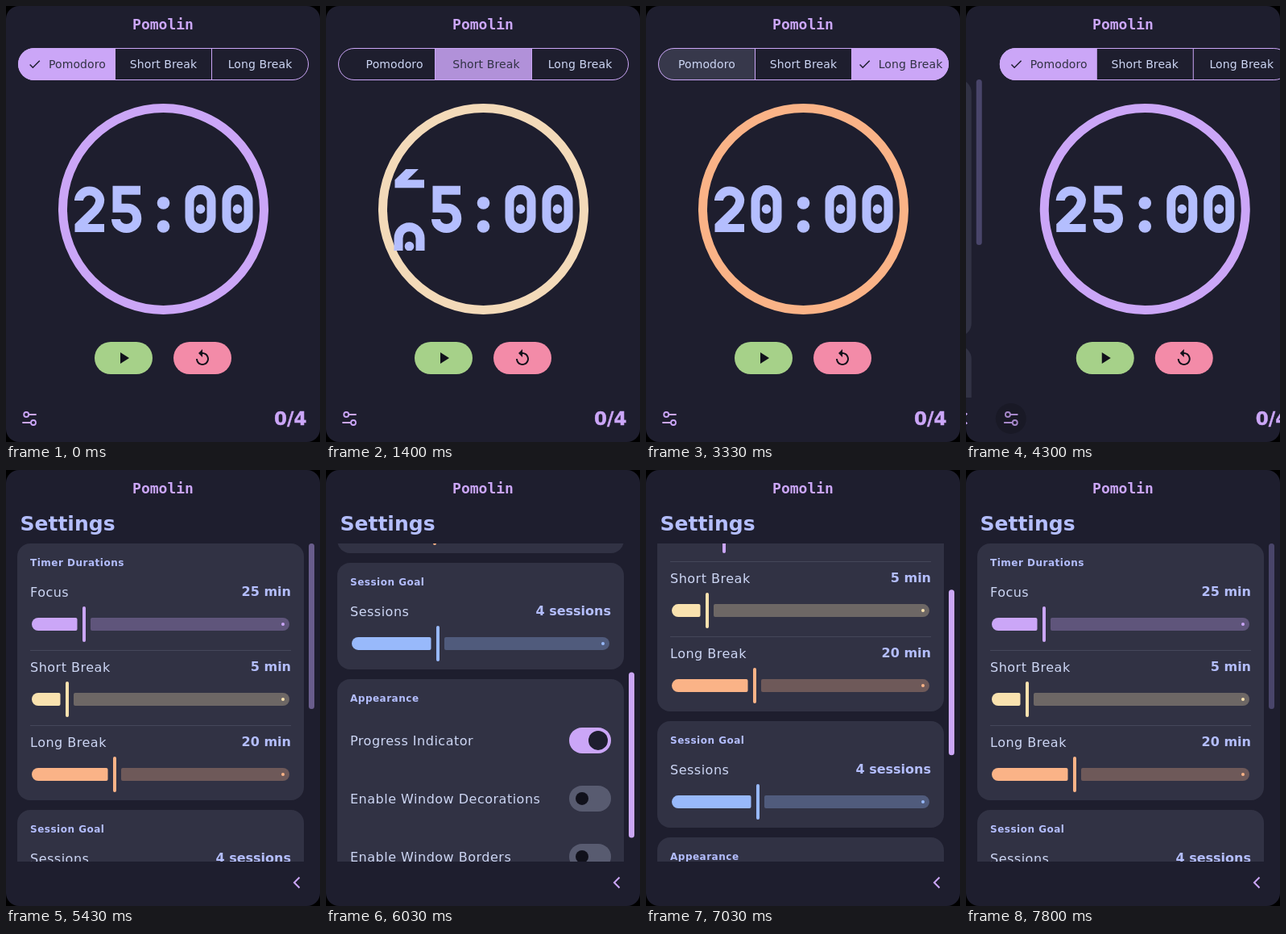
These frames come from a looping animation (390 px wide and 540 px high, 8 s). An HTML page:

```html
<!DOCTYPE html>
<html lang="en">
<head>
<meta charset="utf-8">
<title>Pomodoro timer</title>
<style>
  html, body { margin: 0; width: 100%; height: 100%; overflow: hidden; background: #000; }
  svg { display: block; width: 390px; height: 540px; }
  text { font-family: "DejaVu Sans", sans-serif; fill: #cdd6f4; }
  .title { font: 700 18px "DejaVu Sans Mono", monospace; fill: #cba6f7; text-anchor: middle; }
  .seg { font-size: 14px; letter-spacing: .1px; text-anchor: middle; }
  .goal { font-size: 23px; font-weight: 700; fill: #cba6f7; stroke: #cba6f7; stroke-width: .4; text-anchor: end; }
  .head { font-size: 25px; font-weight: 700; fill: #b4befe; }
  .group { font-size: 12px; font-weight: 700; letter-spacing: .5px; fill: #b4befe; }
  .label { font-size: 16px; letter-spacing: .5px; }
  .value { font-size: 16px; font-weight: 700; fill: #b4befe; text-anchor: end; }
  .line { fill: none; stroke: #cba6f7; }
  .digit { fill: none; stroke: #b4befe; stroke-width: 11; }
  .dot { fill: #b4befe; stroke: none; }
</style>
</head>
<body>
<svg viewBox="0 0 390 540">
  <defs>
    <clipPath id="window"><rect width="390" height="540" rx="16"/></clipPath>
    <clipPath id="pill"><rect x="15" y="52" width="361" height="40" rx="20"/></clipPath>
    <clipPath id="face"><rect x="78" y="202" width="234" height="101"/></clipPath>
    <clipPath id="view"><rect y="91" width="390" height="394"/></clipPath>
    <g id="d0" class="digit">
      <rect x="-13.5" y="-52.5" width="27" height="48" rx="13.5" ry="14"/>
      <circle class="dot" cy="-28.5" r="5.8"/>
    </g>
    <g id="d2" class="digit">
      <path d="M-13 -39V-40A13.2 12.5 0 0 1 13.2 -40C13.2 -34.5 11 -31 7 -26.5L-14 -6"/>
      <path d="M-18 -5H18.5" stroke-width="10"/>
    </g>
    <g id="d5" class="digit">
      <path d="M17.5 -51.7H-11.5V-29.8H1.5A11.8 12.5 0 0 1 13.2 -17.5V-16A13 11.5 0 0 1 -13 -16"/>
    </g>
  </defs>
  <g clip-path="url(#window)">
    <rect width="390" height="540" fill="#1e1e2e"/>
    <g id="timer">
      <g id="tabs"></g>
      <circle id="ring" cx="195.5" cy="251.5" r="125" fill="none" stroke-width="11"/>
      <g id="clock" clip-path="url(#face)"></g>
      <rect x="110" y="416" width="72" height="40" rx="20" fill="#a6d189"/>
      <path transform="translate(134 424)" d="M8 5v14l11-7z" fill="#11111b"/>
      <rect x="208" y="416" width="72" height="40" rx="20" fill="#f38ba8"/>
      <path transform="translate(232 424)" fill="#11111b" d="M12 5V1L7 6l5 5V7c3.31 0 6 2.69 6 6s-2.69 6-6 6-6-2.69-6-6H4c0 4.42 3.58 8 8 8s8-3.58 8-8-3.58-8-8-8z"/>
      <g class="line" stroke-width="1.8" stroke-linecap="round">
        <circle cx="25.2" cy="506" r="3"/><path d="M29 506H37"/>
        <circle cx="34" cy="516" r="3"/><path d="M21 516H30"/>
      </g>
      <circle id="gear" cx="29" cy="511" r="19"/>
      <text class="goal" x="373.5" y="518.5">0/4</text>
    </g>
    <g id="settings">
      <text class="head" x="17.5" y="75">Settings</text>
      <g clip-path="url(#view)"><g id="list"></g></g>
      <rect id="thumb" x="376" width="7" height="205" rx="3.5"/>
      <path class="line" stroke-width="2" d="M364.5 504.5L358 511L364.5 517.5"/>
    </g>
    <text class="title" x="195" y="29">Pomolin</text>
  </g>
</svg>
<script>
const LOOP = 8000, MAX_SCROLL = 363, LINE = 101;
const $ = id => document.getElementById(id);
const set = (el, attrs) => { for (const k in attrs) el.setAttribute(k, attrs[k]); };

// Timing helpers
const clamp = v => Math.min(1, Math.max(0, v));
const span = (t, a, b) => clamp((t - a) / (b - a));
const wave = u => (1 - Math.cos(Math.PI * u)) / 2;
const spring = (ms, w) => 1 - (1 + w * ms / 1000) * Math.exp(-w * ms / 1000);
function fastOutSlowIn(x) {
  let lo = 0, hi = 1, s = .5;
  for (let i = 0; i < 24; i++) {
    s = (lo + hi) / 2;
    const v = 1.2 * (1 - s) ** 2 * s + .6 * (1 - s) * s * s + s ** 3;
    if (v < x) lo = s; else hi = s;
  }
  return s * s * (3 - 2 * s);
}
const mix = (a, b, p) => `rgb(${a.map((v, i) => Math.round(v + (b[i] - v) * p))})`;

const MAUVE = [203, 166, 247], THUMB = [73, 69, 106];
const MODES = [
  { name: 'Pomodoro', width: 71.8, time: '25', color: MAUVE },
  { name: 'Short Break', width: 83.8, time: '05', color: [249, 226, 175] },
  { name: 'Long Break', width: 80, time: '20', color: [250, 179, 135] }
];
const PICKS = [{ at: -9999, mode: 0 }, { at: 1310, mode: 1 }, { at: 2083, mode: 2 }, { at: 3340, mode: 0 }];
// [tab, enter, leave]
const HOVERS = [[1, 915, 1975], [2, 1985, 2810], [1, 2820, 3040], [0, 3050, 4110]];

// Timer screen
$('tabs').innerHTML = `<g clip-path="url(#pill)">${MODES.map((m, i) =>
  `<rect id="fill${i}" x="${15 + 120.5 * i}" y="52" width="121" height="40"/>
   <rect id="tint${i}" x="${15 + 120.5 * i}" y="52" width="121" height="40"/>`).join('')}</g>
  <g class="line"><rect x="15.5" y="52.5" width="360" height="39" rx="19.5"/><path d="M135.5 52V92M255.5 52V92"/></g>
  ${MODES.map((m, i) => `<path id="check${i}" fill="#1e1e2e" d="M9 16.17L4.83 12l-1.42 1.41L9 19 21 7l-1.41-1.41z"/>
  <text id="name${i}" class="seg" y="77">${m.name}</text>`).join('')}`;

const slotX = i => 103.5 + 46 * i;
$('clock').innerHTML = [0, 1].map(i => `<use id="old${i}"/><use id="new${i}"/>`).join('') +
  [244, 273].map(y => `<circle class="dot" cx="195.5" cy="${y}" r="7.8"/>`).join('') +
  [3, 4].map(i => `<use href="#d0" x="${slotX(i)}" y="280"/>`).join('');

// Settings screen
const card = (y, h, title) => `<rect x="14" y="${y}" width="356" height="${h}" rx="16" fill="#313244"/>
  <text class="group" x="30" y="${y + 28}">${title}</text>`;
const slider = (y, name, value, x, color) => `<text class="label" x="30" y="${y - 34}">${name}</text>
  <text class="value" x="354" y="${y - 35}">${value}</text>
  <g fill="${color}">
    <path d="M40 ${y - 8}H${x - 10.5}q2 0 2 2v12q0 2 -2 2H40a8 8 0 0 1 0 -16z"/>
    <rect x="${x - 2}" y="${y - 22}" width="4" height="44" rx="2"/>
    <path opacity=".3" d="M344 ${y - 8}H${x + 10}q-2 0 -2 2v12q0 2 2 2H344a8 8 0 0 0 0 -16z"/>
    <circle cx="344" cy="${y}" r="2"/>
  </g>`;
const rule = y => `<path d="M30 ${y + .5}H354" stroke="#45475a"/>`;
const toggle = (y, name, on) => `<text class="label" x="30" y="${y + 6}">${name}</text>
  <rect x="302" y="${y - 16}" width="52" height="32" rx="16" fill="${on ? '#cba6f7' : '#585b70'}"/>
  <circle cx="${on ? 338 : 318}" cy="${y}" r="${on ? 12 : 8}" fill="${on ? '#1e1e2e' : '#11111b'}"/>`;

$('list').innerHTML =
  card(0, 318, 'Timer Durations') +
  slider(100, 'Focus', '25 min', 97, '#cba6f7') + rule(132) +
  slider(193, 'Short Break', '5 min', 76, '#f9e2af') + rule(225) +
  slider(286, 'Long Break', '20 min', 135, '#fab387') +
  card(330, 132, 'Session Goal') +
  slider(430, 'Sessions', '4 sessions', 139, '#98b9fb') +
  card(474, 272, 'Appearance') +
  toggle(550, 'Progress Indicator', true) +
  toggle(622, 'Enable Window Decorations', false) +
  toggle(694, 'Enable Window Borders', false);

function drawTabs(t, now, before, since) {
  const p = fastOutSlowIn(clamp(since / 350));
  MODES.forEach((m, i) => {
    const active = i === now;
    const s = active ? p : i === before ? 1 - p : 0;
    const x = 75.5 + 120 * i + 13 * s;
    let tint = 0;
    for (const [tab, enter, leave] of HOVERS)
      if (tab === i) tint += .08 * Math.min(span(t, enter - 15, enter + 15), 1 - span(t, leave, leave + 30));
    for (const { at, mode } of PICKS)
      if (mode === i) tint += .07 * Math.min(span(t, at - 80, at), 1 - span(t, at + 230, at + 430));
    set($('fill' + i), { fill: active ? '#cba6f7' : '#1e1e2e' });
    set($('tint' + i), { fill: active ? '#1e1e2e' : '#cdd6f4', opacity: tint });
    $('name' + i).style.fill = active ? '#313244' : '#cdd6f4';
    set($('name' + i), { x });
    const k = .75 * s;
    set($('check' + i), {
      opacity: active ? s : 0,
      transform: `translate(${x - m.width / 2 - 26} ${81 - 24 * k}) scale(${k})`
    });
  });
}

function drawClock(now, before, since) {
  const p = spring(since, 20);
  for (const i of [0, 1]) {
    const a = MODES[before].time[i], b = MODES[now].time[i];
    const q = a === b ? 1 : p;
    set($('old' + i), { href: '#d' + a, x: slotX(i), y: 280 - LINE * q, opacity: q < 1 ? 1 : 0 });
    set($('new' + i), { href: '#d' + b, x: slotX(i), y: 280 + LINE * (1 - q) });
  }
  set($('ring'), { stroke: mix(MODES[before].color, MODES[now].color, spring(since, 38.7)) });
}

function draw(t) {
  let n = PICKS.length - 1;
  while (PICKS[n].at > t) n--;
  const now = PICKS[n].mode, before = PICKS[Math.max(0, n - 1)].mode, since = t - PICKS[n].at;
  drawTabs(t, now, before, since);
  drawClock(now, before, since);

  const slide = 390 * fastOutSlowIn(span(t, 4240, 4640));
  set($('timer'), { transform: `translate(${slide} 0)` });
  set($('settings'), { transform: `translate(${slide - 390} 0)` });
  set($('gear'), { opacity: .18 * span(t, 4090, 4150) });

  const scroll = MAX_SCROLL * (wave(span(t, 5462, 6230)) - wave(span(t, 6270, 7430) ** 1.1));
  set($('list'), { transform: `translate(0 ${91 - scroll})` });
  const lit = t < 5430 ? 0 : Math.min(.24 + span(t, 5430, 5650), 1) - span(t, 7560, 7795);
  set($('thumb'), { y: 91 + scroll * 189 / MAX_SCROLL, fill: mix(THUMB, MAUVE, lit) });
}

const start = performance.now();
function tick() {
  draw((performance.now() - start) % LOOP);
  requestAnimationFrame(tick);
}
tick();
</script>
</body>
</html>
```
